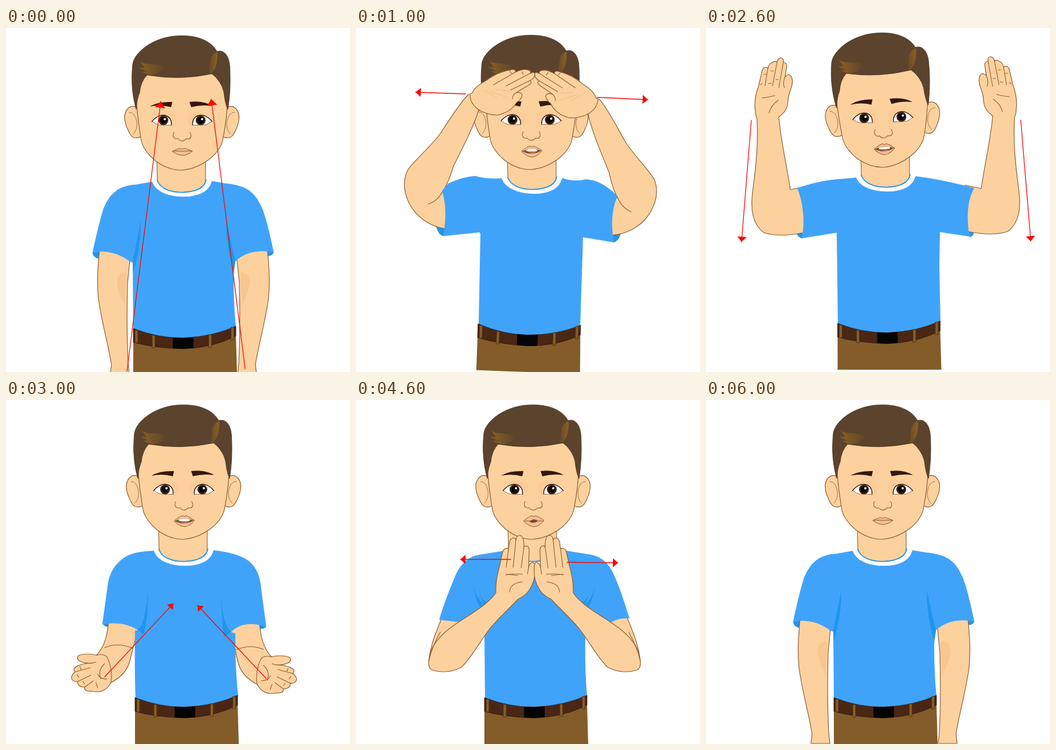
Write an HTML page that moves like this. It is 600 by 600 pixels and loops after 7000 ms.

```html
<!DOCTYPE html>
<html lang="en">
<head>
<meta charset="utf-8">
<title>Signing boy</title>
<style>
html, body { margin: 0; width: 100%; height: 100%; overflow: hidden; background: #fff; }
svg { display: block; width: 100vw; height: 100vh; }
</style>
</head>
<body>
<svg id="stage" viewBox="0 0 600 600">
  <defs>
    <linearGradient id="shineL"><stop offset="0" stop-color="#8a6120"/><stop offset="1" stop-color="#5f452c"/></linearGradient>
    <linearGradient id="shineR" x1="1" x2="0"><stop offset="0" stop-color="#8a6120"/><stop offset="1" stop-color="#674a28"/></linearGradient>
  </defs>
</svg>
<script>
const SKIN = '#fdd19e', LINE = '#8a5d33', SHADE = '#f9c68f', SHIRT = '#40a3fa', FOLD = '#2196ea',
      HAIR = '#5c432d', PANTS = '#835c2a', RED = '#fb0707';

const fill = (d, c) => `<path d="${d}" fill="${c}"/>`;
const line = (d, w = 1.1, c = LINE, cap = 'round') =>
  `<path d="${d}" fill="none" stroke="${c}" stroke-width="${w}" stroke-linecap="${cap}"/>`;
const skin = d => `<path d="${d}" fill="${SKIN}" stroke="${LINE}" stroke-width="1.2" stroke-linejoin="round"/>`;
const group = (t, s) => `<g transform="${t}">${s}</g>`;
const flip = (axis, s, dy = 0) => group(`translate(${2 * axis} ${dy}) scale(-1 1)`, s);
const both = (axis, s, dy) => s + flip(axis, s, dy);
const move = (x, y) => `translate(${x} ${y})`;

// Arrow from (x1,y1) with its tip at (x2,y2)
function arrow(x1, y1, x2, y2, len = 9, half = 8) {
  const a = Math.atan2(y2 - y1, x2 - x1) * 180 / Math.PI;
  return line(`M${x1} ${y1}L${x2} ${y2}`, 1.3, RED) +
    group(`translate(${x2} ${y2}) rotate(${a})`, fill(`M0 0L${-len} ${-half}V${half}Z`, RED));
}

const LIPS = 'M291 211Q302 202 306 202Q309 204 312 202Q317 203 327 210Q318 221 309 221Q300 220 291 211Z';
const lips = d => `<path d="${d}" fill="#f5be90" stroke="${LINE}"/>`;
const mouths = {
  shut: lips('M291 210Q300 206 304 205Q308 207 312 205Q318 206 326 210Q317 217 309 217Q300 217 291 210Z') +
    line('M291 210Q300 209 308 210Q317 209 326 210'),
  open: lips(LIPS) + fill('M292 211Q309 203 326 210Q309 220 292 211Z', '#7a5632') +
    fill('M299 208.500Q309 206 319 208L318 211Q309 212 300 211Z', '#fff') +
    fill('M303 213.500Q311 212 317 213Q311 216 303 213.500Z', '#cf7a59'),
  ooh: lips(LIPS) + fill('M301 212Q309 205 317 211Q309 217 301 212Z', '#7c4a30') + line('M293 211H301M317 211H325')
};

const eye = fill('M261 148Q275 132 298 146Q302 164 290 168L286 152Z', '#fccb98') +
  fill('M255.500 158C263 149 272 145.500 279 147.500C287 150 290 156 289.500 164.500L267 164Q261 162 255.500 158Z', '#fff') +
  line('M256 158Q261 162 267 164L289 164.500', .9) +
  line('M255.500 158C263 149 272 145.500 279 147.500C287 150 290 156 289.500 164', 1.4, '#2a1a14');
const iris = x => `<circle cx="${x}" cy="156" r="8.600" fill="#3d2217"/><circle cx="${x}" cy="156" r="5.800" fill="#070504"/>` +
  `<circle cx="${x + 2.5}" cy="154" r="2" fill="#fff"/>`;

const ear = skin('M230 134Q221 129 214 135Q207 142 208 153Q209 163 213 171Q218 184 224 186Q230 188 237 184Z') +
  line('M216 142Q226 142 229 158Q231 172 223 180', .8);

const face = both(307.7, ear) +
  skin('M228 110C229 145 233 165 236 186Q238 207 262 227Q284 243 307 243Q334 241 358 222Q378 205 380 185C384 165 387 145 388 110L360 70H245Z') +
  both(308, eye) + iris(275.5) + iris(340.5) +
  fill('M252 132Q266 123 291 124L289 133Q270 128 252 132Z', '#35170f') +
  fill('M321 124Q345 121 361 131Q343 128 324 133Z', '#35170f') +
  line('M294 177C290 184 295 190 301 188Q308 196 316 188C323 190 326 184 322 177') +
  `<path d="M228 137C221 112 219 86 222 58C225 38 255 13 295 9C340 5 362 22 369 36C380 32 391 42 391.500 65C393 95 391 118 388 137Q383 127 381 107Q376 86 360 75Q302 87 247 77Q236 88 234 108Q229 120 228 137Z" fill="${HAIR}" stroke="#463020" stroke-width=".8"/>` +
  fill('M235 53C244 61 257 55 276 62Q274 75 254 77Q244 76 238 71L246 71L233 64L243 65Z', 'url(#shineL)') +
  fill('M358 48Q363 38 370 37Q370 60 364 68Q361 74 355 75Z', 'url(#shineR)');

const neck = fill('M264 220L265 264Q290 288 310 285Q345 283 349 262V220Z', SKIN) +
  line('M264 222L265 263M349 222V262');
const collar = line('M260 262C266 279 288 285.500 311 285.500C337 285 352 276 356 261', 7.5, '#fff', 'butt') +
  line('M265 261C270 276 290 282 311 281.500C337 280 348 271 350 260', 1.8, FOLD);

const loop = (x, y) => `<rect x="${x - 2.5}" y="${y}" width="5" height="22" fill="${PANTS}" stroke="#4c3012" stroke-width=".8"/>`;
const waist = fill('M223 540L402 530L404 600H223Z', PANTS) +
  `<path d="M223 519Q266 536 310 535.500Q362 533.500 402 515V532Q362 553 310 554.500Q256 553 223 543Z" fill="#4a2615" stroke="#2a140a" stroke-width=".7"/>` +
  fill('M292 535Q310 536 328 534.500V553.500Q310 555 292 554Z', '#060505') +
  loop(228.5, 522) + loop(258.5, 531) + loop(357, 530) + loop(396, 517);

const NECKLINE = 'c6 18 29 26 56 26c24 0 44 -9 48 -27';

const hanging = both(310.5,
  skin('M165 372C160 420 160 440 162 465C167 505 180 550 185 582L183 599H216L214 580C212 540 212 480 213 440L219 380Z') +
  fill('M194 436Q198 420 211 421Q212 440 208 479Q196 456 194 436Z', SHADE));

const raisedBrow = skin('M176 282L172 350H154C130 346 104 330 92 304C83 285 82 265 90 248C102 230 128 210 147 184C165 157 181 131 195 117L203 113Q206 103 228 91Q246 77 270 73Q279 71 278 77Q291 71 299 73Q306 74 304 79Q313 75 312 82Q311 88 303 92Q308 93 304 98L279 113Q288 111 290 117Q289 124 280 130Q271 147 246 152Q231 152 214 143C206 170 188 205 170 241Q162 268 152 284Z') +
  line('M126 307Q143 302 152 283M199 117Q199 133 216 144M278 77L240 99M304 79L262 101M303 92L270 108M279 113Q272 118 273 124M268 75L271 79M289 76L292 81') +
  line('M235 110L264 122M243 107L268 111M224 108L246 122', .8, '#f3b57d');

const raisedSide = skin('M175 276L147 282C142 245 130 195 127 155Q142 145 143 128Q143 119 148 106Q153 94 149 85Q145 78 138 85L141 66Q140 60 135 60Q136 53 131 52Q126 52 124 59Q119 57 114 61Q110 62 108 70Q101 66 98 74L92 100Q83 125 86 144Q86 152 89 158C91 200 88 235 82 280C77 315 80 342 101 357Q128 366 175 356Z') +
  line('M108 70L103 101M124 59L116 101M135 60L127 104M138 85Q133 96 137 104M98 122Q108 121 120 118M110 148Q113 135 126 126M95 99L98 97M109 97L114 96M122 90L126 90M101 81L105 81M113 75L118 75');

const offering = skin('M180 372C178 410 172 430 158 445Q142 441 128 445Q121 449 128 455Q137 460 150 459Q130 459 121 466Q116 470 121 474Q112 481 115 487Q118 492 125 491Q124 500 137 501Q136 509 150 508Q172 513 183 493C198 485 212 472 216 455Q222 430 236 380Z') +
  line('M158 445Q170 442 176 448Q187 470 183 493M172 432Q194 422 221 433M121 474L147 467M125 491L148 480M137 501L152 490M172 460Q160 470 165 486M150 459L157 457M129 465L131 470M124 479L127 484M134 491L137 495M157 493L160 502M176 487Q163 486 160 478');

const upperArm = skin('M152 374C140 405 130 425 127 455L150 445L192 372Z');
const palm = skin('M127 455C128 430 148 408 175 390C205 370 232 355 244 336C243 317 247 303 251 287L256 264Q260 256 266 260L268 246Q273 237 279 243Q280 236 286 236Q293 237 293 256Q300 252 302 260L301 292Q303 283 309 283Q313 285 312 300Q312 316 303 330Q297 341 283 347C265 366 246 383 231 402C214 425 200 451 184 466C167 475 148 476 133 471Q125 467 127 455Z') +
  line('M266 260L262 292M279 243L274 292M293 256L288 293M301 292L299 304M261 305Q276 302 291 304M268 335Q268 320 290 317M262 304L282 306') +
  line('M147 405Q132 432 127 455');

const chop = skin('M192 335C195 328 189 322 189 305L190 272Q191 261 196 261L197 245Q199 236 203 239Q206 233 211 234Q216 236 216 245L217 278Q224 276 225 286Q230 304 228 318Q228 333 220 337C218 360 219 390 219 420C217 448 214 465 206 480Q190 492 178 492Q160 486 150 466Q143 452 147 435C155 405 175 380 186 358Q194 344 192 335Z') +
  line('M196 261L197 288M203 239L205 284M211 236L213 278M217 278Q215 290 222 303Q226 311 223 322M197 288Q195 304 200 315');

const torso = (x, y, d) => fill(`M${x} ${y}${NECKLINE}${d}Z`, SHIRT);
const cuffs = (...d) => d.map(p => fill(p, FOLD)).join('');

function figure(p) {
  return group(p.body, neck) + group(p.head || p.body, face + mouths[p.mouth]) +
    (p.under || '') + p.shirt + group(p.body, collar) + group(p.hips || p.body, waist) + (p.over || '');
}

const standing = figure({
  body: move(0, 0), mouth: 'shut',
  under: cuffs('M152 386Q152 396 166 398L168 384Z', 'M468 386Q466 393 455 393L454 382Z') + hanging,
  shirt: torso(256, 263, 'L384 266C425 270 437 284 449 312C458 338 463 364 468 386Q425 379 401 402L398 425Q398 480 402 516Q380 540 310 542Q240 540 223 522L222 404L218 403Q190 381 152 386C157 364 163 335 171 310C182 285 195 270 228 268') +
    cuffs('M236 331C237 362 230 397 223 422L222 402Z', 'M385 331C384 362 391 397 398 420L401 402Z')
});

const poses = [
  group(move(-1, 5), standing) + arrow(211, 599, 270, 128, 11, 9) + arrow(417, 594, 358, 124, 11, 9),

  figure({
    body: move(0, 0), head: move(-2.5, 4), hips: 'translate(-11 0) rotate(2.100 310 540)', mouth: 'open',
    under: cuffs('M140 347Q143 360 152 363L160 345Z', 'M462 358Q459 370 450 374L444 358Z') +
      raisedBrow + group('rotate(4.400 313 100)', flip(311.2, raisedBrow)),
    shirt: torso(254, 262, 'Q378 269 400 264Q427 264 456 293C447 315 445 337 448 361L450 374L396 365L391 520Q340 543 280 541Q236 536 214 516L217 359Q216 355 210 357L152 363L154 350C157 330 157 305 150 284L161 271Q188 259 208 258Q228 264 254 262')
  }) + arrow(191, 115, 104, 112) + arrow(421, 121, 509, 125),

  figure({
    body: move(6, -4), head: 'translate(.5 0) rotate(-2 308 160)', hips: move(6.5, -4), mouth: 'open',
    under: cuffs('M158 358Q161 366 168 367L172 350Z', 'M468 355Q466 364 460 365L454 350Z') +
      raisedSide + flip(313.5, raisedSide, -2),
    shirt: torso(261, 259, 'L369 259Q405 263 468 279C456 300 455 326 458 353L462 364L408 356L407 415L409 513Q380 536 315 538Q245 536 230 517L228 357L166 367L169 355C172 330 168 300 159 279Q205 264 239 263L261 261')
  }) + arrow(79, 161, 62, 373) + arrow(549, 161, 566.5, 372),

  figure({
    body: move(2, 0), mouth: 'open',
    under: cuffs('M168 390Q172 396 181 396L184 382Z', 'M454 395Q451 400 442 399L438 384Z') + both(310.5, offering, 3),
    shirt: torso(258, 263, 'Q407 267 425 282Q443 298 445 329L454 396Q415 382 392 405L400 407Q400 475 405 516Q380 540 312 542Q242 540 226 522Q224 470 225 402L231 402Q207 385 168 391L177 326Q180 293 206 275Q222 264 258 263') +
      cuffs('M247 335Q249 375 240 410L229 400Q242 398 247 335Z', 'M375 340Q376 380 380 413L393 404Q378 394 375 340Z')
  }) + arrow(172, 483, 292, 355, 9, 7) + arrow(454, 486, 334, 358, 9, 7),

  figure({
    body: move(1, 0), mouth: 'ooh',
    under: both(311.4, upperArm),
    shirt: torso(257, 263, 'L405 269Q434 272 448 301C459 324 468 352 477 381Q460 379 444 388L400 410Q399 475 403 516Q380 540 311 542Q241 540 225 522L224 410L178 387Q165 386 145 383C155 351 163 331 171 312Q183 279 209 271L257 263') +
      both(311, cuffs('M205 324Q209 344 222 357L216 361Q208 347 205 324Z', 'M214 337Q220 349 228 353L223 357Z')),
    over: both(311.4, palm)
  }) + arrow(270, 278, 182, 278) + arrow(368, 283, 457, 284),

  figure({
    body: move(1, 0), mouth: 'open',
    under: both(309, skin('M217 385L231 395Q226 435 212 468Z')) + cuffs('M162 390L174 391L180 378Z', 'M456 390L446 391L438 378Z'),
    shirt: torso(257, 263, 'L402 268Q436 277 444 305L456 390Q420 374 388 405L398 418Q398 480 403 516Q380 540 311 542Q241 540 225 522L224 405L230 404Q205 378 162 390L172 320Q177 276 213 269L257 263') +
      cuffs('M241 334Q243 375 236 410L226 400Q239 390 241 334Z', 'M376 334Q376 375 383 410L391 402Q378 390 376 334Z'),
    over: both(309, chop)
  }),

  standing
];

const STEP = 1000;
const svg = document.getElementById('stage');
svg.insertAdjacentHTML('beforeend', poses.map(p => `<g display="none">${p}</g>`).join(''));
const layers = [...svg.children].slice(1);
const start = performance.now();
let shown = -1;

function draw(now) {
  const i = Math.floor(Math.max(0, now - start) / STEP) % layers.length;
  if (i !== shown) {
    layers.forEach((g, k) => g.setAttribute('display', k === i ? 'inline' : 'none'));
    shown = i;
  }
  requestAnimationFrame(draw);
}
draw(start);
</script>
</body>
</html>
```
